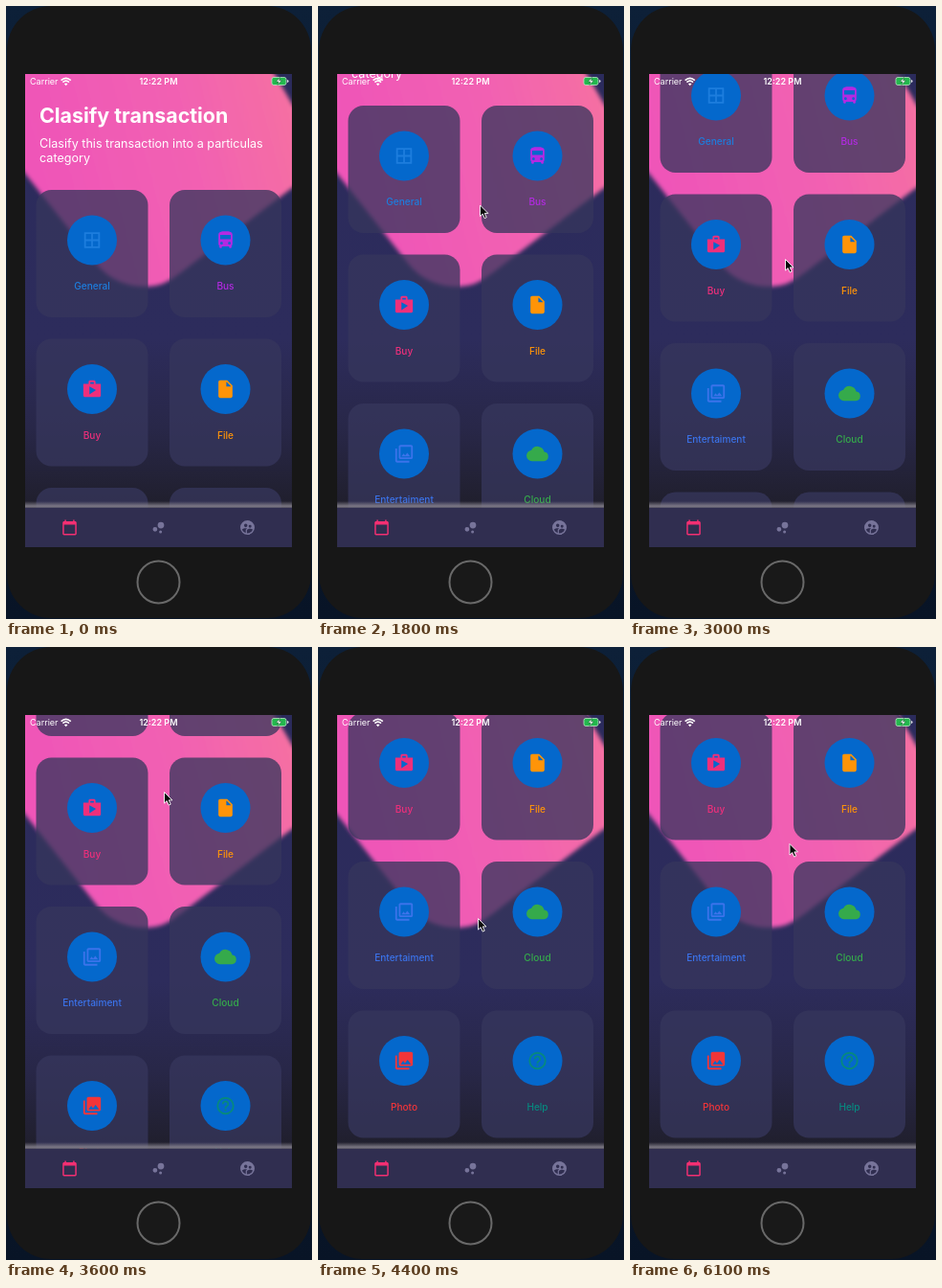
Recreate the animation shown at these times as an HTML page. Size 320x640 px, loop 6200 ms.

```html
<!DOCTYPE html>
<html lang="en">
<head>
<meta charset="utf-8">
<title>Category picker</title>
<style>
  html, body { margin: 0; width: 100%; height: 100%; overflow: hidden; background: #0b1a30; }
  svg { display: block; width: 320px; height: 640px; font-family: Inter, Roboto, sans-serif; }
</style>
</head>
<body>
<svg viewBox="0 0 320 640">
  <defs>
    <linearGradient id="night" x2="0" y2="1">
      <stop offset="0" stop-color="#2b2b5c"/>
      <stop offset=".56" stop-color="#2d2c5c"/>
      <stop offset=".75" stop-color="#282748"/>
      <stop offset=".91" stop-color="#201f2d"/>
    </linearGradient>
    <linearGradient id="pink" x2="1" y2="-.2">
      <stop offset="0" stop-color="#ef55b8"/>
      <stop offset=".5" stop-color="#f261b2"/>
      <stop offset="1" stop-color="#f6759c"/>
    </linearGradient>
    <linearGradient id="glow" x2="0" y2="1">
      <stop offset="0" stop-color="#85818c" stop-opacity="0"/>
      <stop offset=".75" stop-color="#85818c" stop-opacity=".9"/>
      <stop offset="1" stop-color="#5c596a" stop-opacity=".8"/>
    </linearGradient>
    <linearGradient id="rim" x2="0" y2="1">
      <stop offset="0" stop-color="#0d2038"/>
      <stop offset="1" stop-color="#081426"/>
    </linearGradient>
    <filter id="soft" x="-10%" y="-10%" width="120%" height="120%"><feGaussianBlur stdDeviation="2.2"/></filter>
    <clipPath id="screen"><rect x="20" y="71" width="279" height="494"/></clipPath>
  </defs>

  <rect width="320" height="640" fill="url(#rim)"/>
  <rect x="1" y="0" width="318" height="639" rx="46" fill="#171717"/>
  <circle cx="159.5" cy="601.5" r="22" fill="#191919" stroke="#696969" stroke-width="2"/>

  <g clip-path="url(#screen)">
    <rect x="20" y="71" width="279" height="494" fill="url(#night)"/>
    <path d="M0 50H268L281 71L299 102L320 130V178L299 190L182 279Q165 293 147 293Q115 293 96 271L20 175L0 150Z"
      fill="url(#pink)" filter="url(#soft)"/>

    <g id="list">
      <g fill="#fff">
        <text x="35" y="122" font-size="21.4" font-weight="700">Clasify transaction</text>
        <g font-size="12.6">
          <text x="35" y="147.5">Clasify this transaction into a particulas</text>
          <text x="35" y="163">category</text>
        </g>
      </g>
    </g>

    <rect id="edge" x="20" y="517" width="279" height="7" fill="url(#glow)"/>
    <rect x="20" y="524" width="279" height="41" fill="#302e50"/>
    <g id="tabs"></g>

    <g fill="#fff" font-size="9">
      <text x="25" y="82">Carrier</text>
      <text x="159.5" y="82" text-anchor="middle" font-weight="600">12:22 PM</text>
      <g fill="none" stroke="#fff" stroke-width="1.6">
        <path d="M57.6 77.6Q62.7 73 67.8 77.6M59.4 79.6Q62.7 76.7 66 79.6"/>
      </g>
      <path d="M60.9 81.2Q62.7 79.7 64.5 81.2L62.7 83.2Z"/>
      <rect x="278" y="74.5" width="15" height="8" rx="2" fill="#24b84e" stroke="#b9e8c6" stroke-width=".8"/>
      <path d="M294.2 77v3q1.3-.4 1.3-1.5t-1.3-1.5z"/>
      <path d="M286.5 74.5l-4 4.6h2.6l-1 3.4 4.2-4.7h-2.7z" stroke="#14532a" stroke-width=".5"/>
    </g>
  </g>

  <path id="cursor" d="M0 0V11.6L2.7 9.1L4.7 13.6L6.7 12.7L4.8 8.4H8.4Z" fill="#080808" stroke="#fff" stroke-width=".9" stroke-linejoin="round"/>
</svg>

<script>
const LOOP = 6200, STEP = 100, END = 279;
const $ = id => document.getElementById(id);

function add(parent, tag, attrs, text) {
  const el = document.createElementNS('http://www.w3.org/2000/svg', tag);
  for (const k in attrs) el.setAttribute(k, attrs[k]);
  if (text) el.textContent = text;
  return parent.appendChild(el);
}

// Icons live on a 24 unit grid.
function icon(parent, d, cx, cy, size, fill) {
  const k = size / 24;
  add(parent, 'path', {
    d, fill, 'fill-rule': 'evenodd',
    transform: `translate(${cx - size / 2} ${cy - size / 2}) scale(${k})`
  });
}

const BACK_SHEET = 'M2 6v14c0 1.1.9 2 2 2h14v-2H4V6z';
const items = [
  ['General', '#1d7ddd', 'M3 3v18h18V3zM11 19H5v-6h6zM11 11H5V5h6zM19 19h-6v-6h6zM19 11h-6V5h6z'],
  ['Bus', '#b32ae2', 'M4 16c0 .88.39 1.67 1 2.22V20c0 .55.45 1 1 1h1c.55 0 1-.45 1-1v-1h8v1c0 .55.45 1 1 1h1c.55 0 1-.45 1-1v-1.78c.61-.55 1-1.34 1-2.22V6c0-3.5-3.58-4-8-4s-8 .5-8 4zM7.5 17a1.5 1.5 0 1 1 0-3 1.5 1.5 0 0 1 0 3zM16.5 17a1.5 1.5 0 1 1 0-3 1.5 1.5 0 0 1 0 3zM18 11H6V6h12z'],
  ['Buy', '#ee2f7b', 'M16 6V4c0-1.1-.9-2-2-2h-4c-1.1 0-2 .9-2 2v2H2v13c0 1.1.9 2 2 2h16c1.1 0 2-.9 2-2V6zM10 4h4v2h-4zM9 18V9l7.5 4z'],
  ['File', '#ff9408', 'M6 2c-1.1 0-2 .9-2 2v16c0 1.1.9 2 2 2h12c1.1 0 2-.9 2-2V8l-6-6zM13 9V3.5L18.5 9z'],
  ['Entertaiment', '#3b73ea', 'M8 2h12c1.1 0 2 .9 2 2v12c0 1.1-.9 2-2 2H8c-1.1 0-2-.9-2-2V4c0-1.1.9-2 2-2zM8 4v12h12V4zM11.5 11.7l1.7 2.2 2.5-3.1L19 15H9z' + BACK_SHEET],
  ['Cloud', '#35aa4b', 'M19.35 10.04A7.5 7.5 0 0 0 5.35 8.04 6 6 0 0 0 6 20h13a5 5 0 0 0 .35-9.96z'],
  ['Photo', '#f23539', 'M8 2h12c1.1 0 2 .9 2 2v12c0 1.1-.9 2-2 2H8c-1.1 0-2-.9-2-2V4c0-1.1.9-2 2-2zM11 12l2 2.7 3-3.7 4 5H8z' + BACK_SHEET],
  ['Help', '#07897f', 'M12 2a10 10 0 1 0 0 20 10 10 0 0 0 0-20zM12 4a8 8 0 1 1 0 16 8 8 0 0 1 0-16zM11 16h2v2h-2zM12 6c-2.2 0-4 1.8-4 4h2c0-1.1.9-2 2-2s2 .9 2 2c0 2-3 1.75-3 5h2c0-2.25 3-2.5 3-5 0-2.2-1.8-4-4-4z']
];

items.forEach(([name, color, d], i) => {
  const x = 31.5 + (i % 2) * 139.5, y = 192 + (i >> 1) * 155.5, cx = x + 58.5;
  add($('list'), 'rect', { x, y, width: 117, height: 133, rx: 16, fill: '#37375c', 'fill-opacity': .76 });
  add($('list'), 'circle', { cx, cy: y + 52.5, r: 26, fill: '#0468cc' });
  icon($('list'), d, cx, y + 52.5, i === 5 ? 23 : 22, color);
  add($('list'), 'text', {
    x: cx, y: y + 104, fill: color, 'font-size': 10.1, 'font-weight': 500, 'text-anchor': 'middle'
  }, name);
});

const tabs = [
  ['#f32f72', 'M20 3h-1V1h-2v2H7V1H5v2H4c-1.1 0-2 .9-2 2v16c0 1.1.9 2 2 2h16c1.1 0 2-.9 2-2V5c0-1.1-.9-2-2-2zM20 21H4V8h16z'],
  ['#77749a', 'M4 14.4a3.2 3.2 0 1 0 6.4 0 3.2 3.2 0 0 0-6.4 0zM12.8 18a2 2 0 1 0 4 0 2 2 0 0 0-4 0zM10.8 8.8a4.5 4.5 0 1 0 9 0 4.5 4.5 0 0 0-9 0z'],
  ['#77749a', 'M12 2a10 10 0 1 0 0 20 10 10 0 0 0 0-20zM15.6 8.3a1.95 1.95 0 1 1 0 3.9 1.95 1.95 0 0 1 0-3.9zM9.6 6.8a2.35 2.35 0 1 1 0 4.7 2.35 2.35 0 0 1 0-4.7zM9.6 15.9v3.7c-2.4-.7-4.3-2.6-5.1-4.9 1-1.1 3.6-1.7 5.1-1.7.5 0 1.2.1 1.9.2-1.6.9-1.9 2-1.9 2.7zM12 20l-.8-.1v-4c0-1.4 2.9-2.1 4.4-2.1 1 0 2.9.4 3.8 1.1A8 8 0 0 1 12 20z']
];
tabs.forEach(([color, d], i) => icon($('tabs'), d, 66.5 + i * 93, 544.5, i ? 18 : 17.5, color));

const ease = {
  line: p => p,
  in: p => p * p,
  out: p => 1 - (1 - p) ** 2,
  both: p => p * p * (3 - 2 * p)
};

// Rows: time, easing into the row, values.
const scrollKeys = [
  [0, 'line', 0], [1200, 'line', 0], [1800, 'in', 88], [2300, 'out', 151],
  [3050, 'line', 151], [3600, 'in', 232], [4100, 'out', END], [4600, 'line', END],
  [5300, 'both', 313.5], [5500, 'line', 313.5], [6000, 'both', END], [LOOP, 'line', END]
];
const cursorKeys = [
  [0, 'line', 335, 420], [500, 'line', 335, 420], [1100, 'both', 171, 296], [1200, 'line', 171, 296],
  [1800, 'in', 169.5, 208], [2300, 'out', 167, 145], [2900, 'both', 162.5, 264.5], [3050, 'line', 162.5, 264.5],
  [3600, 'both', 165.5, 151.5], [3800, 'line', 165.5, 150], [4400, 'both', 167.5, 283.5],
  [4600, 'line', 167.5, 283.5], [5300, 'both', 167, 205.5], [LOOP, 'line', 167, 205.5]
];

function sample(keys, t) {
  const i = keys.findIndex(k => k[0] > t), [t0, , ...a] = keys[i - 1], [t1, kind, ...b] = keys[i];
  const p = ease[kind]((t - t0) / (t1 - t0));
  return a.map((v, n) => v + (b[n] - v) * p);
}

function draw(now) {
  const t = Math.floor(now % LOOP / STEP) * STEP;
  const [y] = sample(scrollKeys, t), [cx, cy] = sample(cursorKeys, t);
  $('list').setAttribute('transform', `translate(0 ${-y})`);
  $('cursor').setAttribute('transform', `translate(${cx} ${cy})`);
  $('edge').setAttribute('opacity', Math.max(0, 1 - Math.max(0, y - END) / 10));
}

const start = performance.now();
function tick() {
  draw(performance.now() - start);
  requestAnimationFrame(tick);
}
tick();
</script>
</body>
</html>
```
